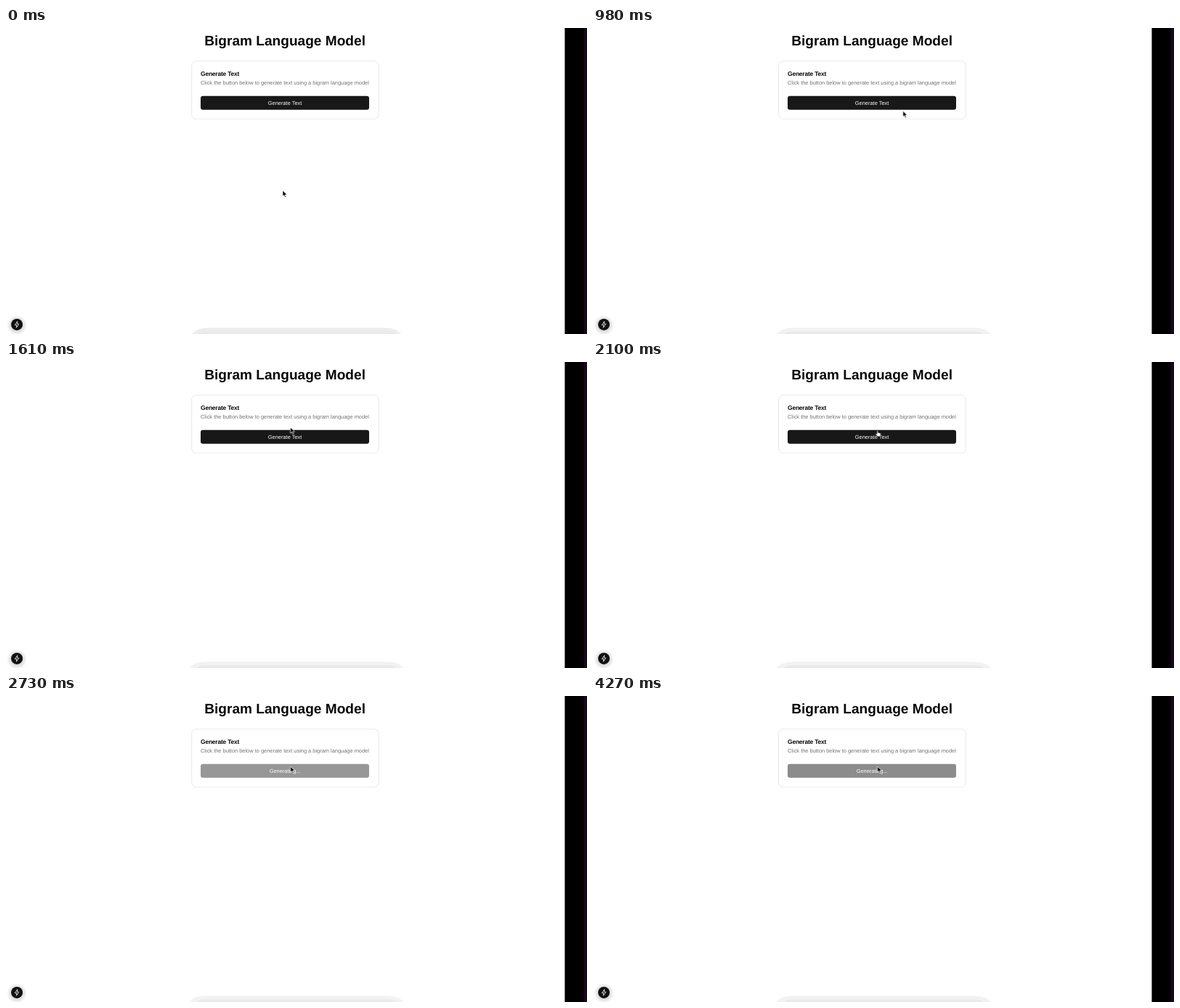
Animation of 800x422 px, one loop 8 s. Source, as an HTML page:

```html
<!DOCTYPE html>
<html lang="en">
<head>
<meta charset="utf-8">
<title>Bigram Language Model</title>
<style>
  html, body { margin: 0; width: 100%; height: 100%; overflow: hidden; background: #fff; }
  svg { display: block; width: 800px; height: 422px; }
  text { font-family: "Liberation Sans", Arial, sans-serif; text-rendering: geometricPrecision; }
  .title { font-size: 19.1px; font-weight: 700; fill: #0a0a0a; }
  .heading { font-size: 8.49px; font-weight: 700; letter-spacing: -.025em; fill: #0a0a0a; }
  .note { font-size: 7.43px; fill: #737373; }
  .label { font-size: 7.43px; fill: #fafafa; }
  .mid { text-anchor: middle; }
  .card { filter: drop-shadow(0 .6px .6px rgba(0, 0, 0, .12)); }

  .cursor, .arrow, .hand, .button, .face, .idle, .busy, .dock {
    animation: 8s steps(1) infinite;
  }
  .cursor { animation-name: move; }
  .arrow { animation-name: arrow; }
  .hand { animation-name: hand; }
  .button { animation-name: disable; }
  .face { animation-name: hover; }
  .idle { animation-name: idle; }
  .busy { animation-name: busy; }
  .dock { animation-name: dock; }

  /* One step lasts 70 ms, which is .875% of the loop. */
  @keyframes move {
    0% { transform: translate(381px, 224px); animation-timing-function: steps(8); }
    7% { transform: translate(451.6px, 125px); }
    9.625% { transform: translate(451.6px, 125px); animation-timing-function: steps(7); }
    15.75% { transform: translate(393.5px, 100px); animation-timing-function: steps(5); }
    20.125% { transform: translate(391.6px, 90px); animation-timing-function: steps(2); }
    21.875% { transform: translate(391.6px, 89.5px); }
    23.625% { transform: translate(391.6px, 89.5px); animation-timing-function: steps(3); }
    26.25% { transform: translate(391.6px, 94px); animation-timing-function: steps(3); }
    28.875% { transform: translate(391.8px, 98px); }
    34.125%, 100% { transform: translate(391.6px, 97px); }
  }
  @keyframes arrow {
    0%, 19.25%, 34.125%, 100% { opacity: 1; }
    16.625%, 26.25% { opacity: 0; }
  }
  @keyframes hand {
    0%, 19.25%, 34.125%, 100% { opacity: 0; }
    16.625%, 26.25% { opacity: 1; }
  }
  @keyframes hover {
    0% { fill: #181818; }
    15.75% { fill: #181818; animation-timing-function: steps(2); }
    17.5% { fill: #2e2e2e; }
    18.375% { fill: #2e2e2e; animation-timing-function: steps(2); }
    20.125% { fill: #181818; }
    26.25% { fill: #181818; animation-timing-function: steps(3); }
    28.875% { fill: #2e2e2e; }
    34.125% { fill: #2e2e2e; animation-timing-function: steps(2); }
    35.875%, 100% { fill: #181818; }
  }
  @keyframes disable {
    0% { opacity: 1; }
    34.125%, 100% { opacity: .5; }
  }
  @keyframes idle {
    0% { opacity: 1; }
    34.125%, 100% { opacity: 0; }
  }
  @keyframes busy {
    0% { opacity: 0; }
    34.125%, 100% { opacity: 1; }
  }
  @keyframes dock {
    0% { fill: #ededed; transform: scaleX(.975); animation-timing-function: steps(8); }
    7%, 100% { fill: #f2f2f2; transform: scaleX(1); }
  }
  .dock { transform-origin: 400px 422px; }
</style>
</head>
<body>
<svg viewBox="0 0 800 422">
  <defs>
    <radialGradient id="halo">
      <stop offset=".5" stop-color="#000" stop-opacity=".16"/>
      <stop offset="1" stop-color="#000" stop-opacity="0"/>
    </radialGradient>
  </defs>
  <rect width="800" height="422" fill="#fff"/>

  <text class="title mid" x="384.1" y="24.4">Bigram Language Model</text>

  <rect class="card" x="255.7" y="45.6" width="257.6" height="80" rx="6.4" fill="#fff" stroke="#e5e5e5" stroke-width=".6"/>
  <text class="heading" x="268" y="66">Generate Text</text>
  <text class="note" x="268" y="78">Click the button below to generate text using a bigram language model</text>

  <g class="button">
    <rect class="face" x="268" y="93.8" width="232" height="19" rx="3.2"/>
    <text class="label mid idle" x="384.1" y="105.7">Generate Text</text>
    <text class="label mid busy" x="384.1" y="105.7">Generating...</text>
  </g>

  <!-- Dock edge -->
  <path class="dock" d="M252 422Q259 413.4 275 413.4H525Q541 413.4 548 422Z"/>
  <path d="M262 422Q266 418.6 275 418.6H525Q534 418.6 538 422Z" fill="#e9e9e9"/>

  <!-- Status badge -->
  <circle cx="15" cy="410" r="14" fill="url(#halo)"/>
  <circle cx="15" cy="408.9" r="8" fill="#111"/>
  <path d="M15.7 404.6L12.2 409.6H14.7L14.3 413.2L17.8 408.2H15.3Z" fill="none" stroke="#fff" stroke-width=".8" stroke-linejoin="round"/>

  <rect x="769.4" width="31" height="422" fill="#000"/>
  <rect x="795.6" width="5" height="422" fill="#1a071f"/>

  <g class="cursor">
    <path class="arrow" d="M0 0V8.2L1.9 6.5L3.2 9.6L4.6 9L3.3 6H5.8Z" fill="#000" stroke="#fff" stroke-width=".7" stroke-linejoin="round"/>
    <path class="hand" d="M-.8 .8Q-.8 0 0 0T.8 .8V3.2L3.9 3.9Q4.8 4.2 4.7 5.2L4.2 8.8H-.2L-2.7 5.6Q-2.9 4.6 -1.9 4.7L-.8 5.4Z" fill="#fff" stroke="#000" stroke-width=".6" stroke-linejoin="round"/>
  </g>
</svg>
</body>
</html>
```
